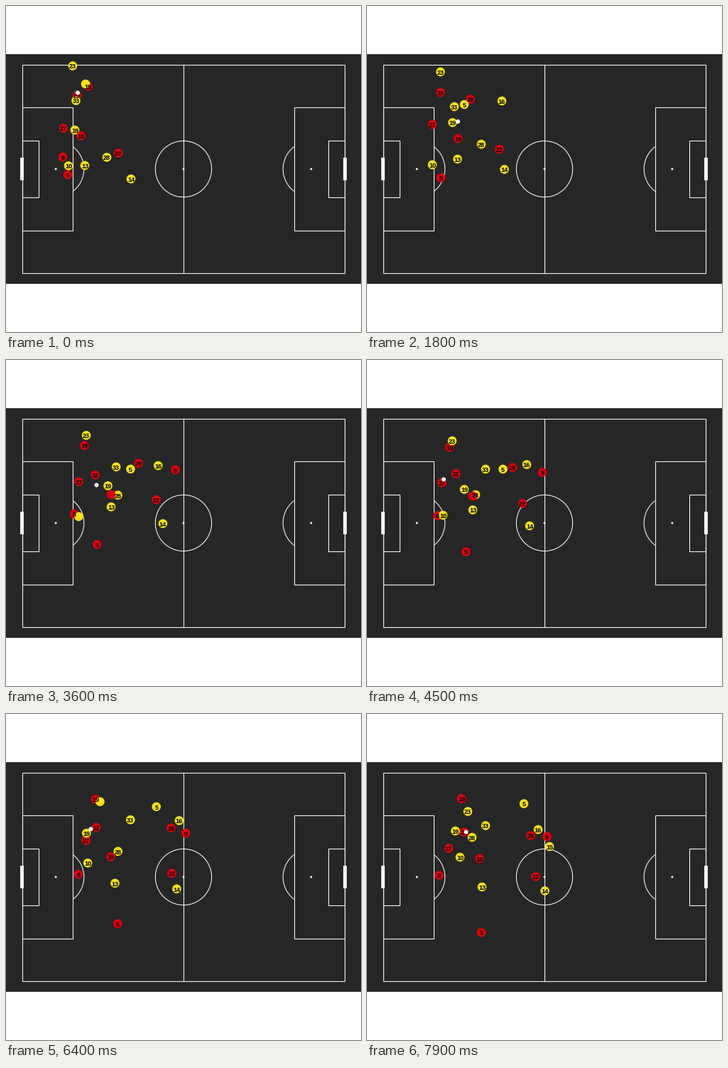
Write a matplotlib script that moves like this. It is 500 by 460 pixels and loops after 8 s.

```python
import numpy as np
import matplotlib.pyplot as plt
from matplotlib.animation import FuncAnimation
from matplotlib.patches import Arc, Circle, Rectangle

W, H, DPI = 500, 460, 80
FRAMES, STEP = 80, 100
PX = 72 / DPI
DARK, LINE = "#262626", "#f2f2f2"
RED, YELLOW = "#dc000c", "#f3e11b"
KEYS = np.array([0, 18, 28, 45, 57, 70, 79])

fig = plt.figure(figsize=(W / DPI, H / DPI), dpi=DPI, facecolor="white")
ax = fig.add_axes([0, 0, 1, 1])
ax.set_xlim(0, W)
ax.set_ylim(H, 0)
ax.axis("off")


def box(x, y, w, h, fill=False, color=LINE):
    ax.add_patch(Rectangle((x, y), w, h, fill=fill, color=color,
                           lw=0 if fill else 1.1 * PX, zorder=1))


def dot(x, y, r, color, z):
    return ax.add_patch(Circle((x, y), r, color=color, lw=0, zorder=z))


def draw_pitch():
    mid_x, mid_y, half, top, tall = 250, 230, 227.3, 82.9, 294.3
    reach = 39.6
    box(0, 68, W, 324, True, DARK)
    box(mid_x - half, top, 2 * half, tall)
    ax.plot([mid_x] * 2, [top, top + tall], color=LINE, lw=1.1 * PX, zorder=1)
    ax.add_patch(Circle((mid_x, mid_y), reach, fill=False, ec=LINE,
                        lw=1.1 * PX, zorder=1))
    dot(mid_x, mid_y, 1.5, LINE, 1)
    swing = np.degrees(np.arccos(24.1 / reach))
    for side in (-1, 1):
        goal = mid_x + side * half
        for depth, height in ((71.5, 174.6), (23.8, 79.2)):
            box(min(goal, goal - side * depth), mid_y - height / 2, depth, height)
        spot = goal - side * 47.5
        dot(spot, mid_y, 1.5, LINE, 1)
        turn = 0 if side < 0 else 180
        ax.add_patch(Arc((spot, mid_y), 2 * reach, 2 * reach, angle=turn,
                         theta1=-swing, theta2=swing, ec=LINE,
                         lw=1.1 * PX, zorder=1))
        box(goal - 2.2, mid_y - 16, 4.4, 32, True)


class Track:
    """Smooth path through the key points; hidden near keys without a point."""

    def __init__(self, points):
        self.seen = [p is not None for p in points]
        self.t = KEYS[self.seen].astype(float)
        self.p = np.array([p for p in points if p], float)
        many = len(self.t) > 1
        self.v = np.gradient(self.p, self.t, axis=0) if many else 0 * self.p

    def visible(self, t):
        return self.seen[int(np.argmin(abs(KEYS - t)))]

    def at(self, t):
        if t <= self.t[0]:
            return self.p[0] + self.v[0] * (t - self.t[0])
        if t >= self.t[-1]:
            return self.p[-1]
        i = np.searchsorted(self.t, t, side="right") - 1
        d = self.t[i + 1] - self.t[i]
        u = (t - self.t[i]) / d
        a, b = self.p[i], self.p[i + 1]
        ease = u * u * (3 - 2 * u)
        return (a + (b - a) * ease + d * u * (1 - u)
                * ((1 - u) * self.v[i] - u * self.v[i + 1]))


players = []


def add(color, number, *points):
    disc = dot(0, 0, 6.3, color, 3)
    label = ax.text(0, 0, number, family="Liberation Sans", weight="bold",
                    size=9 * PX, ha="center", va="center_baseline", zorder=4)
    players.append((Track(points), disc, label, 4.95 * len(number)))


draw_pitch()

add(RED, "19", (115.5, 113), (103.5, 122), (106, 119), (116, 123),
    (122.5, 121.5), (129, 119.5), (133, 119.5))
add(RED, "29", (100, 126), (145.5, 131.5), (169, 139.5), (205, 151.5),
    (225.5, 156.5), (234.5, 165), (230.5, 171.5))
add(RED, "27", (81, 172.5), (92, 167), (98.5, 170), (105.5, 173),
    (108, 173.5), (116, 183), (115, 189.5))
add(RED, "22", (158, 207.5), (186.5, 202), (203, 196.5), (219, 202.5),
    (227.5, 217), (237, 229), (237.5, 229.5))
add(RED, "8", (80, 213), None, (92.5, 216), (99.5, 219.5),
    (102.5, 224.5), (101, 227), (101.5, 227.5))
add(RED, "5", (87, 238), (104, 242.5), (118, 252), (139.5, 270.5),
    (153.5, 288.5), (159, 301), (161, 308.5))
add(RED, "32", None, None, (126.5, 163.5), (125, 160.5),
    (126, 158.5), (129, 162), (136.5, 166.5))
add(RED, "9", None, None, (230, 151.5), (247, 158.5),
    None, (253.5, 170.5), (253.5, 173))
add(YELLOW, "23", (94, 84.5), (103.5, 93), (108, 99), (120, 114),
    (131, 118), (134, 129.5), (142, 137.5))
add(YELLOW, "5", (112, 110), (137, 139), (159, 148.5), (191.5, 154),
    (207, 138.5), (215, 126.5), (221, 126.5))
add(YELLOW, "33", (98.5, 133.5), (123, 142), (142, 146.5), (167, 154),
    (176, 151.5), (172.5, 149.5), (167, 157.5))
add(YELLOW, "19", (97, 175), (120.5, 164.5), (140.5, 170.5), (137, 182.5),
    (118, 176), (114, 163), (124.5, 165))
add(YELLOW, "10", (88, 225.5), (92, 224), (98, 222.5), (107, 219),
    (112.5, 216.5), (119, 205), (131, 202))
add(YELLOW, "13", (111, 225), (127.5, 216), (143.5, 209), (149, 211.5),
    (151.5, 231.5), (156, 242.5), (162, 244))
add(YELLOW, "28", (142, 213.5), (161, 195), (162, 193), (153, 190),
    (158.5, 196.5), (155, 188), (148, 174))
add(YELLOW, "14", (176, 244), (193.5, 230.5), (211, 230), (229, 234),
    (236.5, 243.5), (244, 248.5), (250.5, 249.5))
add(YELLOW, "16", None, (190, 134), (204, 147), (225, 147.5),
    (238, 147.5), (246, 154.5), (241, 163))
add(YELLOW, "15", None, None, None, None, None, None, (257, 187))
add(RED, "18", (105.5, 183), (128, 187), (143, 188.5), (149, 192),
    (148, 197.5), (149, 204), (158.5, 204))

ball = dot(0, 0, 3, "white", 5)
ball_track = Track([(101, 122.5), (128, 163), (141, 179), (108, 168.5),
                    (110, 168.5), (129, 159), (139.5, 166.5)])


def update(t):
    taken = []
    for track, disc, label, width in players:
        shown = track.visible(t)
        x, y = track.at(t)
        disc.center = x, y
        disc.set_visible(shown)
        # A number is dropped when it would cover one already placed.
        free = shown and all(abs(x - a) >= (width + w) / 2 or abs(y - b) >= 5.8
                             for a, b, w in taken)
        label.set_position((x, y + 0.3))
        label.set_visible(free)
        if free:
            taken.append((x, y, width))
    ball.center = tuple(ball_track.at(t))
    return []


anim = FuncAnimation(fig, update, frames=FRAMES, interval=STEP,
                     repeat=True, repeat_delay=0, blit=False)
plt.show()
```
